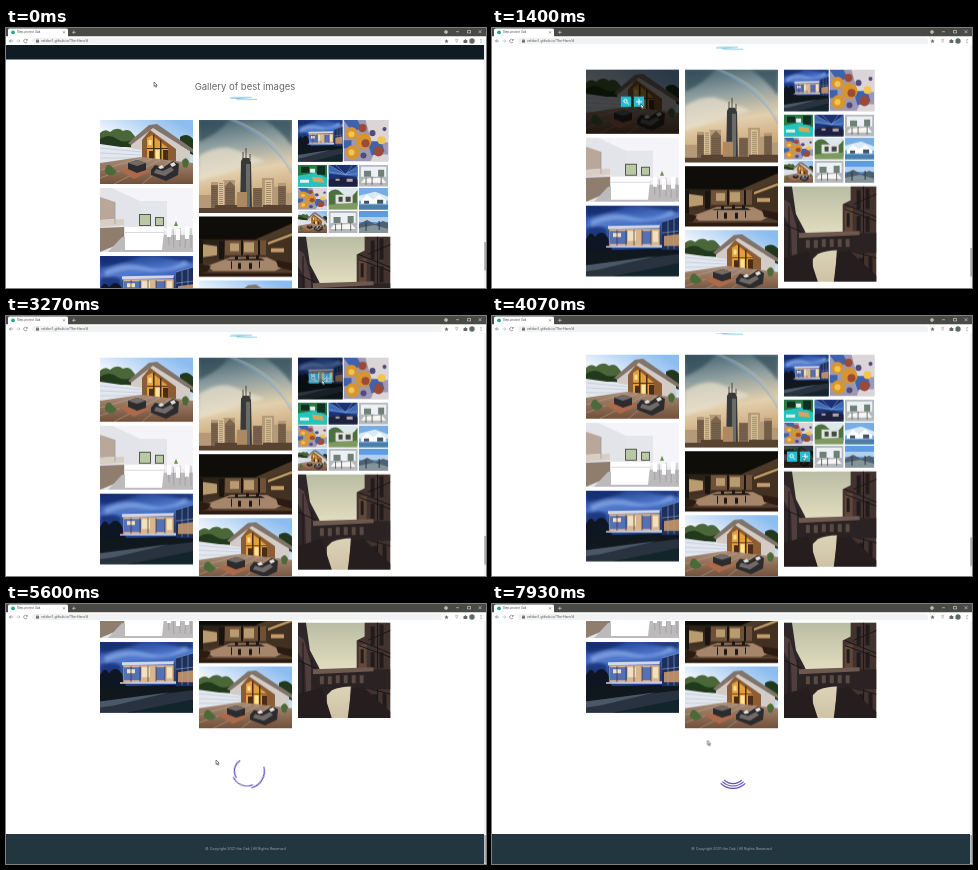
Animation, 480 px wide and 260 px high, one loop 8 s. Source, as an HTML page:

```html
<!DOCTYPE html>
<html lang="en">
<head>
<meta charset="utf-8">
<title>Gallery</title>
<style>
html, body { margin: 0; width: 100%; height: 100%; overflow: hidden; background: #fff; }
svg { display: block; }
#stage { width: 480px; height: 260px; }
text { font-family: Inter, sans-serif; }
.anim { animation: 8s linear infinite; }

#page { animation-name: scroll; }
@keyframes scroll {
  0%, 2% { transform: translateY(0); animation-timing-function: ease-in-out; }
  8%, 50.3% { transform: translateY(-50.3px); animation-timing-function: ease-in-out; }
  55%, 64% { transform: translateY(-145.5px); animation-timing-function: ease-in-out; }
  68%, 100% { transform: translateY(-190px); }
}
#thumb { animation-name: thumb; }
@keyframes thumb {
  0%, 2% { transform: translateY(0); }
  8%, 50.3% { transform: translateY(6px); }
  55%, 100% { transform: translateY(17px); }
}
#cursor { animation-name: cursor; animation-timing-function: ease-in-out; }
@keyframes cursor {
  0%, 2% { transform: translate(148px, 54px); }
  11%, 18% { transform: translate(149px, 76px); }
  25% { transform: translate(189.5px, 100px); }
  32%, 36% { transform: translate(248px, 89px); }
  41%, 43% { transform: translate(316px, 64px); }
  47%, 50.5% { transform: translate(313px, 142px); }
  54%, 57% { transform: translate(243px, 103px); }
  60.5%, 62.5% { transform: translate(240px, 197px); }
  69%, 85% { transform: translate(210px, 156px); }
  95%, 100% { transform: translate(215.5px, 136.5px); }
}
.hover { opacity: 0; }
.h1 { animation-name: h1; }
.h2 { animation-name: h2; }
.h3 { animation-name: h3; }
.h4 { animation-name: h4; }
.h5 { animation-name: h5; }
@keyframes h1 { 0%, 10%, 21%, 100% { opacity: 0 } 12.5%, 18.5% { opacity: 1 } }
@keyframes h2 { 0%, 29.6%, 39%, 100% { opacity: 0 } 33%, 36.5% { opacity: 1 } }
@keyframes h3 { 0%, 39.5%, 46%, 100% { opacity: 0 } 42%, 43.8% { opacity: 1 } }
@keyframes h4 { 0%, 45.6%, 53.5%, 100% { opacity: 0 } 48%, 51.3% { opacity: 1 } }
@keyframes h5 { 0%, 52.5%, 60%, 100% { opacity: 0 } 55%, 57.5% { opacity: 1 } }

#button { animation-name: hide; }
#loader { animation-name: show; }
#footer { animation-name: push; }
@keyframes hide { 0%, 61.62% { opacity: 1 } 61.63%, 100% { opacity: 0 } }
@keyframes show { 0%, 61.62% { opacity: 0 } 61.63%, 100% { opacity: 1 } }
@keyframes push { 0%, 61.62% { transform: translateY(0) } 61.63%, 100% { transform: translateY(43.5px) } }

/* nested rings with turns of 2 s, 3 s and 1.5 s, started by the click */
.ring { animation-name: spin; }
@keyframes spin { 0%, 61.625% { transform: rotate(0) } 100% { transform: rotate(var(--turn)) } }
</style>
</head>
<body>
<svg id="stage" viewBox="0 0 480 260">
<defs>
  <linearGradient id="day" x1=".8" x2=".4" y2=".5"><stop stop-color="#8dbdf0"/><stop offset="1" stop-color="#f4f8fd"/></linearGradient>
  <linearGradient id="deck" x2="0" y2="1"><stop stop-color="#a98d78"/><stop offset="1" stop-color="#73503a"/></linearGradient>
  <linearGradient id="night" x2=".2" y2="1"><stop stop-color="#16347f"/><stop offset=".3" stop-color="#4f78cc"/><stop offset=".6" stop-color="#20448f"/></linearGradient>
  <linearGradient id="dusk" x2=".15" y2="1"><stop stop-color="#41606e"/><stop offset=".3" stop-color="#8f9fa0"/><stop offset=".6" stop-color="#e3d0ae"/><stop offset="1" stop-color="#c39a68"/></linearGradient>
  <linearGradient id="room" x2="0" y2="1"><stop stop-color="#0b0a07"/><stop offset=".45" stop-color="#2d2319"/><stop offset="1" stop-color="#5b412f"/></linearGradient>
  <linearGradient id="pale" x2="0" y2="1"><stop stop-color="#b9bda3"/><stop offset=".5" stop-color="#e2ddc0"/><stop offset="1" stop-color="#cfc2a6"/></linearGradient>
  <filter id="soft"><feGaussianBlur stdDeviation="1.6"/></filter>

  <symbol id="terrace" viewBox="0 0 93 64" preserveAspectRatio="none">
    <path fill="url(#day)" d="M0 0h93v64H0z"/>
    <path fill="#4b6638" d="M0 13q5-5 10-1 7-6 13-1 6-3 10 3l4 5v9L0 25z"/>
    <path fill="#22391d" d="M0 19q9-6 17 0t20-2v10L0 27zM80 17q7-5 13 2v16l-13-6z"/>
    <path fill="#d2cbc6" d="M31 22 50 6 90 31v13l-46 1-13-18z"/>
    <path fill="#81746b" d="m28 23 21-18 8-1 36 25v4L53 8 31 25z"/>
    <path fill="#8c5d35" d="m50 10 26 19v15H42V20z"/>
    <path fill="#e2a03a" d="m47 18 5-3 16 13v15H47z"/>
    <path fill="#4a2d17" d="M53 15h1.500v27H53zM60 20h1.500v22H60zM47 28h21v1H47zM63 30h5v12h-5zM49 31h4v11h-4z"/>
    <path fill="#ffe39a" d="M55.500 30h4v9h-4zM48.500 20h3v5h-3z"/>
    <path fill="#e3e8f0" d="m0 24 42 6v10L0 44z"/>
    <path stroke="#a9b5c6" stroke-width=".5" fill="none" d="m0 28 42 4M0 33l42 2M0 38l42 0"/>
    <path fill="url(#deck)" d="m0 43 41-6 52 6v21H0z"/>
    <path stroke="#c9aa8d" stroke-width=".5" fill="none" d="m0 50 42-12M0 58l52-19M14 64l46-24M42 64l28-23"/>
    <path fill="#ac6a4a" d="m19 50 19-5 13 6-17 8z"/>
    <path fill="#2c2c2f" d="m28 43 9-3 9 3v7l-9 3-9-4zM51 50l4-5 9 2 9-6 6 3-1 11-12 6-15-6z"/>
    <path fill="#716a67" d="m28 43 9-3 9 3-9 3zM56 49l7 2 8-4 3 3-9 6-11-3z"/>
    <path fill="#e4e0da" d="m58 47 4-2 2 3-4 1zM70 44l4-2 2 3-4 2z"/>
    <path fill="#4b6a39" d="M5 49q3-8 8-1l4 4q-7 7-12 0zM82 41q4-6 7 1l-2 6-4-1z"/>
  </symbol>

  <symbol id="kitchen" viewBox="0 0 93 64" preserveAspectRatio="none">
    <path fill="#e3e3ea" d="M0 0h93v64H0z"/>
    <path fill="#f4f4f9" d="m12 0 28 13v30h53V0z"/>
    <path fill="#e5e6ec" d="m40 13 27 0v27H40z"/>
    <path fill="#b9a899" d="m0 9 15 5v17L0 32z"/>
    <path fill="#8f7d6d" d="M0 40 24 39v15L0 64z"/>
    <path fill="#d8cec4" d="m0 32 24-1v6L0 39z"/>
    <path fill="#55574f" d="M39 26h12v12H39zM55 29h9v9h-9z"/>
    <path fill="#b8c9a4" d="M40 27h10v10H40zM56 30h7v7h-7z"/>
    <path fill="#bdbabb" d="m22 49 71-4v19H8z"/>
    <path fill="#fff" d="M25 39h39v5l-2 18H25z"/>
    <path fill="#d9dae0" d="M25 44h39v1H25z"/>
    <path fill="#eceef2" d="M65 43h28v4H65z"/>
    <path stroke="#98979c" stroke-width=".7" fill="none" d="m68 40 1 17M73 41l1 19M80 40v19M86 41l-1 19M91 40v20M15 14v22"/>
    <path fill="#fff" d="M67 39h4v10h-4zM76 41h4v11h-4zM85 39h4v12h-4z"/>
    <path fill="#699249" d="m74 38 2-5 2 5z"/>
  </symbol>

  <symbol id="villa" viewBox="0 0 93 70" preserveAspectRatio="none">
    <path fill="url(#night)" d="M0 0h93v70H0z"/>
    <g filter="url(#soft)"><path fill="#88aae8" opacity=".75" d="M4 15q21-11 42-4t40-7l2 5q-24 9-43 6T6 20z"/>
    <path fill="#102a6c" opacity=".75" d="M0 0h40Q24 9 0 11zM55 0h38v7zM0 22q12-4 21 1v10H0z"/></g>
    <path fill="#0e1624" d="M0 33q5-10 9-2 7-9 13 1l4 12 67-2v13H0z"/>
    <path fill="#d5d5e6" d="m22 20 52-1v3l-52 1z"/>
    <path fill="#d9b48c" d="M23 23h51v17H23z"/>
    <path fill="#5670b5" d="M24 25h17v13H24zM56 25h9v13h-9z"/>
    <path fill="#f2e0bd" d="M42 25h8v10h-8zM67 25h5v11h-5zM27 27h8v4h-8z"/>
    <path stroke="#332f40" stroke-width=".7" d="M23 24v17M31 24v16M40 24v16M48 24v16M56 24v16M65 24v16M74 20v22"/>
    <path fill="#c9cbdb" d="m20 40 56-1v2.500H20z"/>
    <path fill="#1d2f5c" d="m76 16 17-5v33H76z"/>
    <path fill="#b98b62" d="m78 30 15-2v12H78z"/>
    <path stroke="#91a6cc" stroke-width=".6" d="m76 16 17-5M76 27l17-2M82 15v28M88 13v30"/>
    <path fill="#10181d" d="M0 45q44-3 93 1v24H0z"/>
    <path fill="#29333f" d="m0 59 93-11v9L35 70H0z"/>
    <path fill="#4a5766" d="m0 59 70-9-56 13-14 2z"/>
    <path fill="#12252c" d="m27 70 66-13v13z"/>
  </symbol>

  <symbol id="skyline" viewBox="0 0 93 93" preserveAspectRatio="none">
    <path fill="url(#dusk)" d="M0 0h93v93H0z"/>
    <g filter="url(#soft)"><path fill="#2c4754" opacity=".65" d="M0 0h30Q22 12 0 22zM66 0h27v26Q82 11 66 0z"/>
    <path fill="#e8e2cf" opacity=".7" d="M0 36q20-12 34-7T66 41L0 61z"/></g>
    <g fill="none" stroke-width="1.500" opacity=".4"><path stroke="#d5c0a0" d="M35 0q42 16 58 48"/><path stroke="#8fc9e8" d="M33 0q42 17 60 51"/><path stroke="#7d9fd0" d="M31 0q43 18 62 54"/></g>
    <path fill="#b59a7a" d="M0 75h12V62h7v10h5V60h12v33H0zM57 70h6V58h12v9h4v-4h8v10h6v20H57z"/>
    <path fill="#7e664e" d="M12 93V65h7v28zM26 93V66l5-5 5 5v27zM54 93V68h9v25zM79 93V66h8v27z"/>
    <path fill="#d9c096" d="M19 61h6v32h-6zM66 60h7v33h-7z"/>
    <path fill="#38393a" d="m42 41 2-3h6l2 4 1 51H41z"/>
    <path fill="#6a6c66" d="m47 44 4 0v47h-4z"/>
    <path stroke="#332c28" stroke-width=".8" d="M47 28v10M44 32v7M51 34v6"/>
    <path fill="#ad8962" d="M38 72h10v21H38z"/>
    <path fill="#57432f" d="M0 88h16v-3h22v2h26v-2h29v8H0z"/>
    <g id="windows" fill="#514335" opacity=".55"></g>
  </symbol>

  <symbol id="lounge" viewBox="0 0 93 61" preserveAspectRatio="none">
    <path fill="url(#room)" d="M0 0h93v61H0z"/>
    <path fill="#0e0d09" d="M0 0h93v8L57 23H0z"/>
    <path fill="#4b3a28" d="m57 23 36-16v9L68 27z"/>
    <path fill="#6d5138" d="m26 24 42 0v15H26z"/>
    <path fill="#b99b70" d="M31 27h9v8h-9zM45 26h10v10H45zM4 28l14 2v9L4 41z"/>
    <path fill="#423021" d="m67 25 26-9v31l-26-6z"/>
    <path fill="#c29d6b" d="m69 26 24-9v2.500l-24 9zM72 32h13v4H72z"/>
    <path fill="#1a1410" d="M0 24h4v24H0zM20 25h5v18h-5zM42 24h2v15h-2zM59 24h2v15h-2z"/>
    <path fill="#a5866a" d="m8 50 24-9h36l18 9-10 5H14z"/>
    <path fill="#1d1612" d="m30 43 32-1 4 2H27zM32 45h1v8h-1zM60 45h1v7h-1zM36 40h3v4h-3zM47 39h3v4h-3zM57 39h3v4h-3zM39 47h3v6h-3zM50 47h3v6h-3z"/>
    <path fill="#2b1b12" d="m77 44 16 3v8l-14-4zM0 48l12 2-4 6-8 1zM0 57h93v4H0z"/>
  </symbol>

  <symbol id="bridge" viewBox="0 0 93 96" preserveAspectRatio="none">
    <path fill="url(#pale)" d="M0 0h93v96H0z"/>
    <path fill="#2f2629" d="m0 0 8 0 4 28 9 17 8 20v31H0z"/>
    <path fill="#4f3e3d" d="m0 13 6 4 7 25 8 20 3 34H9L7 42 0 30z"/>
    <path fill="#43332f" d="M93 0H67v14l-8 4v29l-6 18-2 31h42z"/>
    <path fill="#614839" d="M61 22h8v26h-8zM60 62h9v34h-9z"/>
    <path fill="#221b1c" d="M73 4h4v19h-4zM82 2h4v21h-4zM73 30h4v16h-4zM82 30h4v16h-4zM63 27h3v14h-3zM75 72h5v15h-5zM85 71h4v17h-4zM62 73h4v14h-4z"/>
    <path stroke="#191719" stroke-width="1" fill="none" d="m61 18 32 13M61 23l32 12M55 62l38 10M80 0v96M70 18 93 8M0 38l18 8M0 77l20-8M5 20v76M14 37v59"/>
    <path fill="#2b2223" d="m14 48 79-1v20H69q-18-6-35 1l-9 9H14z"/>
    <path fill="#6d594e" d="m15 47 61-2v4l-61 3z"/>
    <path fill="#594a44" d="M22 54h4v8h-4zM30 54h4v8h-4zM38 53h4v8h-4zM46 53h4v8h-4zM54 53h4v8h-4zM62 53h4v8h-4z"/>
    <path fill="#251d1e" d="m0 72 24-7 10 31H0zM54 65h12l27 25v6H50z"/>
  </symbol>

  <symbol id="balloons" viewBox="0 0 45 41" preserveAspectRatio="none">
    <path fill="#9d98b4" d="M0 0h45v41H0z"/><path fill="#dcd5d8" d="M22 0h23v22H28zM30 34h15v7H27z"/>
    <path fill="#3f62ad" d="M0 0h14l4 8-9 4zM24 21h14l3 10-13 4zM0 20h8v8H0z"/>
    <g fill="#d8952f"><circle cx="8" cy="13" r="6"/><circle cx="20" cy="21" r="8"/><circle cx="9" cy="32" r="7"/></g>
    <g fill="#9b4a38"><circle cx="19" cy="8" r="4"/><circle cx="22" cy="23" r="4"/><circle cx="35" cy="31" r="5"/></g>
    <g fill="#f0c64e"><circle cx="8" cy="14" r="3"/><circle cx="8" cy="32" r="3"/><circle cx="38" cy="20" r="4"/></g>
    <g fill="#514b78"><circle cx="29" cy="13" r="3"/><circle cx="20" cy="35" r="3"/><circle cx="41" cy="9" r="2"/></g>
  </symbol>

  <symbol id="pool" viewBox="0 0 29 22" preserveAspectRatio="none">
    <path fill="#287a42" d="M0 0h29v22H0z"/><path fill="#25c3bd" d="m0 11 17-3 12 5v9H0z"/>
    <path fill="#122d24" d="M3 2h8v6H3zM19 1h8v9h-8z"/><path fill="#d9a45b" d="m14 12 10 1 2 5-11-1z"/><path fill="#e8eeee" d="M2 15h9v3H2zM12 4h5v4h-5z"/>
  </symbol>
  <symbol id="aqua" viewBox="0 0 29 22" preserveAspectRatio="none">
    <path fill="#1d3274" d="M0 0h29v22H0z"/><path fill="#3d69b4" d="m0 0 16 9L29 2v10L0 9z"/>
    <path stroke="#86a8da" stroke-width=".5" fill="none" d="m0 0 17 10L29 1M7 0l10 10L24 0M0 7l17 3 12-1"/><path fill="#1d2140" d="m0 15 14-3 15 3v7H0z"/><path fill="#b5a6aa" d="M7 14h4v2H7zM18 14h6v3h-6z"/>
  </symbol>
  <symbol id="dining" viewBox="0 0 29 22" preserveAspectRatio="none">
    <path fill="#b4b9bd" d="M0 0h29v22H0z"/><path fill="#edf1f6" d="M2 2h25v10H2z"/><path fill="#6f8177" d="M5 6h7v6H5zM19 5h6v7h-6z"/>
    <path fill="#f7f6f3" d="m5 14 18-1 4 5H2z"/><path stroke="#55534f" stroke-width=".8" d="M7 13v7M13 12v8M22 12v8"/>
  </symbol>
  <symbol id="garden" viewBox="0 0 29 22" preserveAspectRatio="none">
    <path fill="#dce8ed" d="M0 0h29v22H0z"/><path fill="#4d7040" d="M0 5q7-7 14 1t15-4v16H0z"/><path fill="#e2e2de" d="M7 7h17v9H7z"/><path fill="#424a46" d="M10 9h4v5h-4zM17 9h5v5h-5z"/><path fill="#7f9a60" d="m0 17 29-2v7H0z"/>
  </symbol>
  <symbol id="resort" viewBox="0 0 29 22" preserveAspectRatio="none">
    <path fill="#77ade5" d="M0 0h29v22H0z"/><path fill="#d9eaf7" d="m0 8 16-4 13 5v4H0z"/><path fill="#fff" d="m2 13 6-6 6 5 6-5 7 6v3H2z"/><path fill="#41536a" d="M5 13h5v3H5zM18 12h6v4h-6z"/><path fill="#4b7fa8" d="M0 17h29v5H0z"/>
  </symbol>
  <symbol id="coast" viewBox="0 0 29 22" preserveAspectRatio="none">
    <path fill="#5e9be0" d="M0 0h29v22H0z"/><path fill="#b5d0ea" d="M0 6h29v5H0z"/><path fill="#4d6170" d="m0 13 8-4 8 4 8-3 5 2v10H0z"/><path fill="#85939a" d="m0 17 15-3 14 4v4H0z"/><path stroke="#2d3841" d="M7 11v9M20 10v9"/>
  </symbol>
  <g id="tools">
    <path fill="#25bdd2" d="M-11.600-5.200h10.200V5.200h-10.200zM1.400-5.200h10.200V5.200H1.400z"/>
    <g fill="none" stroke="#fff"><circle cx="-7" cy="-.7" r="1.700"/><path d="m-5.700.7 2 2M6.500-3v6M3.500 0h6"/></g>
  </g>
  <clipPath id="view"><path d="M0 17h478v243H0z"/></clipPath>
</defs>

<path fill="#fff" d="M0 0h480v260H0z"/>
<g clip-path="url(#view)">
  <g id="page" class="anim">
    <path fill="#0f1c23" d="M0 0h478v31.500H0z"/>
    <text x="239" y="62" font-size="9.500" fill="#666" text-anchor="middle">Gallery of best images</text>
    <path fill="#7cc6e4" d="m224 69.500 22-.4v.5l-13 .6 18 .8v.7l-20-.2-1-.8-6-.2z"/>
    <path stroke="#b5e0f0" stroke-width=".5" d="M226 69.100l20-.4M231 71.700l15 .3"/>
    <g id="gallery"></g>
    <g id="button" class="anim">
      <path fill="#1fd4a6" d="M218 336h42v15.500h-42z"/>
      <path stroke="#fff" stroke-width=".9" d="M224.500 343.700h4M226.500 341.700v4"/>
      <text x="232" y="345.100" font-size="3.700" font-weight="600" fill="#fff">LOAD MORE</text>
    </g>
    <g id="loader" class="anim">
      <g transform="translate(241 357)" fill="none" stroke="#5a4bbd" stroke-width="1.100">
        <g class="ring anim" style="--turn:552.6deg"><path d="M-12.300-12.300A17.400 17.400 0 0 1 12.300-12.300"/>
          <g class="ring anim" style="--turn:368.4deg"><path d="M-10.600-10.600A15 15 0 0 1 10.600-10.600"/></g>
          <g class="ring anim" style="--turn:736.8deg"><path d="M-8.900-8.900A12.600 12.600 0 0 1 8.900-8.900"/></g>
        </g>
      </g>
    </g>
    <g id="footer" class="anim">
      <path fill="#22363f" d="M0 376.500h478v30H0z"/>
      <text x="239.500" y="392.300" font-size="3.600" fill="#9aa4a8" text-anchor="middle">© Copyright 2021 the Oak | All Rights Reserved</text>
    </g>
  </g>
</g>

<path fill="#f1f1f1" d="M478 17h2v243h-2z"/>
<path id="thumb" class="anim" fill="#a9a9a9" d="M478.300 214h1.700v28.500h-1.700z"/>

<g id="browser" fill="none" stroke="#666" stroke-width=".6">
  <path fill="#494946" stroke="none" d="M0 0h480v8.500H0z"/>
  <path fill="#fff" stroke="none" d="M0 8.500h480V17H0zM2 8.500V2q0-1.500 1.500-1.500h57Q62 .5 62 2v6.500z"/>
  <path fill="#f0f2f3" stroke="none" d="M29 9.700h404q3.200 0 3.200 3.200t-3.200 3.200H29q-3-.2-3-3.200t3-3.200z"/>
  <circle cx="7" cy="4.300" r="1.900" fill="#24a886" stroke="none"/>
  <text x="11" y="5.400" font-size="2.900" fill="#444" stroke="none">Step-project Oak</text>
  <path d="m57 3.300 2 2m0-2-2 2"/>
  <path stroke="#ddd" d="M66 4.300h3.600M67.800 2.500v3.600M450 3.700h3M461.500 2.400h3V5h-3zM472.500 2.200l3 3m0-3-3 3"/>
  <circle cx="440" cy="4" r="1.700" fill="#e4e8e4" stroke="none"/><circle cx="440" cy="4" r=".8" fill="#6f8a6b" stroke="none"/>
  <path d="M7 13H3.500m1.500-1.600L3.500 13 5 14.600"/><path stroke="#aaa" d="M10.500 13H14m-1.500-1.600L14 13l-1.500 1.600"/>
  <path d="M21 12a1.800 1.800 0 1 0 .1 1.800M21.300 11v1.300H20M30.500 12.500v-.7q1-1.200 2 0v.7"/>
  <path fill="#666" stroke="none" d="M30 12.300h3v2.300h-3zM457.500 12h1.300v-1h1v1h1.500v3h-3.800zM440.500 11l.6 1.400 1.400.1-1 1 .3 1.500-1.300-.8-1.300.8.3-1.500-1-1 1.400-.1z"/>
  <path stroke="#a8a8a8" d="M449.500 11.500h2.500l-1.300 3z"/>
  <circle cx="466" cy="13" r="2.700" fill="#5d6b67" stroke="none"/>
  <path stroke-width=".8" stroke-dasharray=".8 .7" d="M475 11v4.200"/>
  <text x="35" y="14.300" font-size="3.600" fill="#555" stroke="none" style="font-family:Roboto,sans-serif">veldon1.github.io/The-Ham/#</text>
</g>
<g id="cursor" class="anim"><path fill="#fff" stroke="#222" stroke-width=".55" d="M0 0v4.400l1-.9.8 1.700.8-.4-.8-1.600h1.400z"/></g>
</svg>
<script>
const gallery = document.getElementById('gallery');
const tile = (photo, x, y, w, h, hover) => {
  const overlay = hover ? `<g class="hover anim ${hover}">
    <path fill="#000" fill-opacity=".7" d="M${x} ${y}h${w}v${h}h${-w}z"/>
    <use href="#tools" x="${x + w / 2}" y="${y + h / 2}"/></g>` : '';
  return `<use href="#${photo}" x="${x}" y="${y}" width="${w}" height="${h}"/>${overlay}`;
};
const thumbs = ['pool', 'aqua', 'dining', 'balloons', 'garden', 'resort', 'terrace', 'dining', 'coast'];
gallery.innerHTML = [
  tile('terrace', 94, 92, 93, 64, 'h1'),
  tile('kitchen', 94, 160, 93, 64),
  tile('villa', 94, 228, 93, 70.5),
  tile('skyline', 193, 92, 93, 93, 'h2'),
  tile('lounge', 193, 188.5, 93, 60.5, 'h5'),
  tile('terrace', 193, 252.5, 93, 62),
  tile('villa', 292, 92, 44.5, 41.5, 'h3'),
  tile('balloons', 337.5, 92, 45, 41.5),
  ...thumbs.map((photo, i) =>
    tile(photo, 292 + i % 3 * 30.5, 136.7 + Math.floor(i / 3) * 23.1, 29.2, 22, i === 6 && 'h4')),
  tile('bridge', 292, 208.5, 92.5, 95.5)
].join('');

// Window columns on the towers: x, top, width
document.getElementById('windows').innerHTML = [[13, 67, 5], [20, 63, 4], [27, 68, 8], [55, 70, 7], [67, 62, 5], [80, 68, 6]]
  .map(([x, top, w]) => `<path d="${Array.from({ length: Math.floor((86 - top) / 2) },
    (_, i) => `M${x} ${top + i * 2}h${w}v.8h${-w}z`).join('')}"/>`).join('');
</script>
</body>
</html>
```
